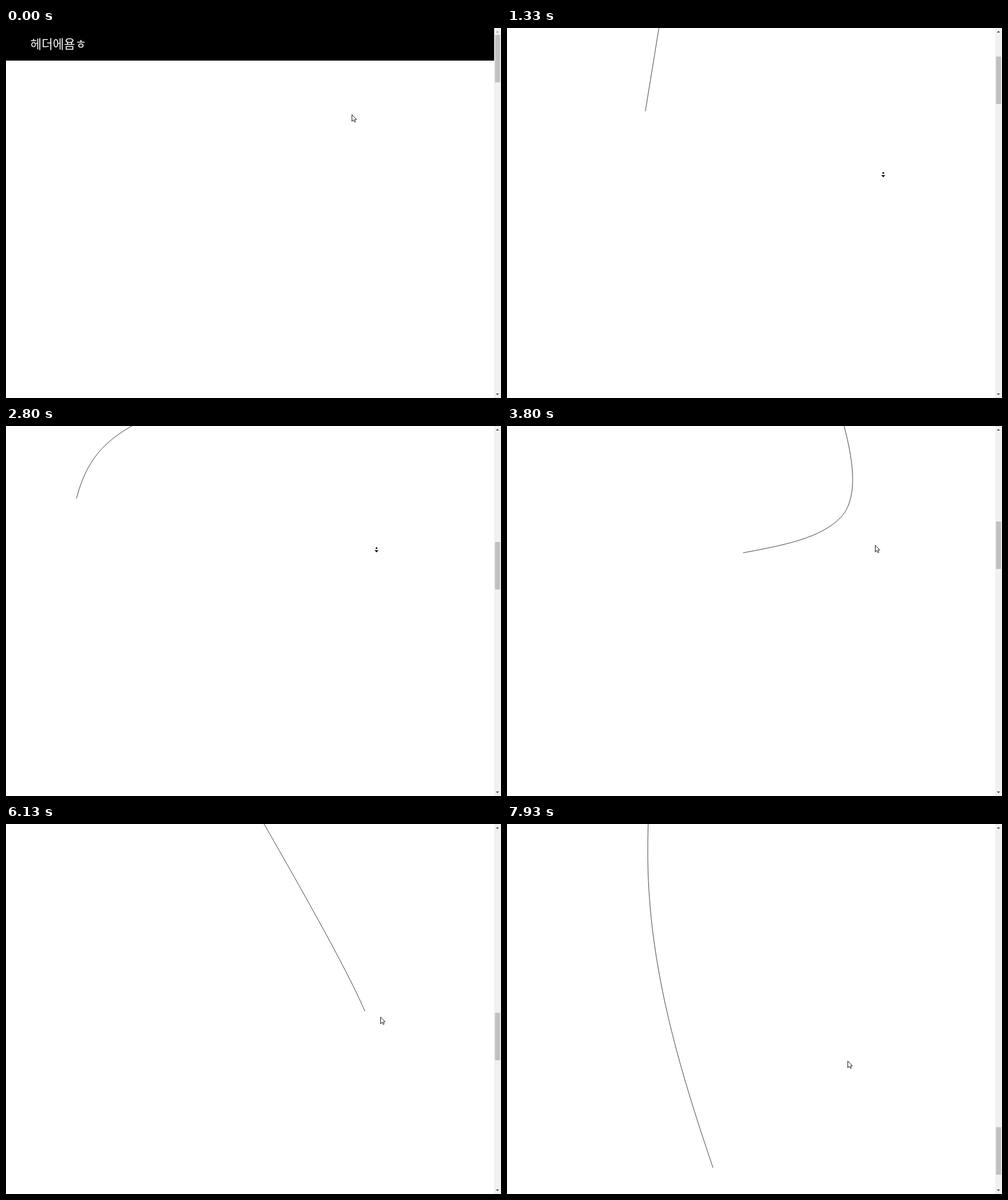
Recreate the animation shown at these times as an HTML page. Size 865 by 647 pixels, loop 8 s.

```html
<!DOCTYPE html>
<html lang="ko">
<head>
<meta charset="utf-8">
<title>Scroll line</title>
<style>
  html, body { margin: 0; width: 100%; height: 100%; overflow: hidden; background: #fff; }
  svg { display: block; width: 865px; height: 647px; }
  text { font: 21.3px "Noto Sans CJK KR", "Noto Sans CJK", sans-serif; fill: #fff; }
  .line { fill: none; stroke: #000; stroke-width: .75; }
</style>
</head>
<body>
<svg viewBox="0 0 865 647">
  <g id="page">
    <rect width="853" height="57"/>
    <text x="42.6" y="36">헤더에욤ㅎ</text>
    <!-- Each part grows while the scroll offset runs from data-from to data-to. -->
    <path class="line" data-from="0" data-to="1537" d="M304.5 57L241.5 443C217 590 520 930 589 1208
      C597 1238 604 1272 604 1301S597 1354 583 1368C548 1404 486 1416 414 1429.5
      C334 1445 274 1456 220 1487C170 1515 140 1549 123.5 1612.5Q116.5 1645 116.5 1679"/>
    <path class="line" data-from="1537" data-to="2478" d="M116.5 1679C116.5 1860 306 2220 451 2478
      C522 2602 597 2735 627 2805"/>
    <path class="line" data-from="2478" data-to="4037" d="M627 2805C665 2888 735 3000 735 3120
      S405 3435 337 3605S246 3935 246 4082C245 4277 298.5 4457 360 4638"/>
  </g>
  <rect x="853" width="12" height="647" fill="#f1f1f1"/>
  <rect id="thumb" x="854.5" width="9" height="83" fill="#c1c1c1"/>
  <path id="upArrow" d="M856 8h5.6l-2.8-3z"/>
  <path d="M856 639h5.6l-2.8 3z" fill="#505050"/>
  <path id="pointer" d="M.5.5V12.2L3.2 9.7 5.1 13.6 6.9 12.8 5.1 9H8.6Z" fill="#fff" stroke="#000" stroke-width=".9"/>
  <g id="panner">
    <circle r="1.6"/>
    <path d="M-3.5 3.7h7L0 7.4z"/>
    <path id="panUp" d="M-3.5-3.7h7L0-7.4z"/>
  </g>
</svg>
<script>
const LOOP = 8000, STEP = 1000 / 15, SCROLL_PER_THUMB_PX = 7.79;
const PAN_START = 730, PAN_MOVE = 860, PAN_END = 3400;
const $ = id => document.getElementById(id);
const lines = [...document.querySelectorAll('.line')];

// Turning points of the gesture: [time, scroll] and [time, x, y].
const scrollKeys = [
  [0, 0], [800, 0], [1333, 296], [2533, 1395], [2800, 1487], [3400, 1540], [3800, 1208],
  [4270, 850], [5133, 1537], [6133, 2478], [6867, 3241], [7933, 4037], [8200, 4100]
];
const mouseKeys = [
  [0, 604, 151], [133, 651, 166], [533, 651, 166], [733, 653, 175], [1333, 657.5, 253.5],
  [2800, 647.5, 213.5], [3800, 643, 208], [5133, 663, 299], [6133, 654, 337], [7933, 595, 414]
];

// Smooth interpolation that never overshoots its keys.
function ease(keys, column, t) {
  const last = keys.length - 1;
  const rate = i => i < 0 || i >= last ? 0
    : (keys[i + 1][column] - keys[i][column]) / (keys[i + 1][0] - keys[i][0]);
  const slope = i => {
    const a = rate(i - 1), b = rate(i);
    return a * b > 0 ? 2 * a * b / (a + b) : 0;
  };
  const next = keys.findIndex(key => key[0] > t);
  if (next < 0) return keys[last][column];
  const i = next - 1, span = keys[next][0] - keys[i][0];
  const u = (t - keys[i][0]) / span, v = 1 - u;
  return keys[i][column] * v * v * (1 + 2 * u) + keys[next][column] * u * u * (1 + 2 * v)
    + span * u * v * (v * slope(i) - u * slope(next));
}

function drawLine(line, scroll) {
  const { from, to } = line.dataset;
  const part = Math.min(1, (scroll - from) / (to - from));
  const length = line.getTotalLength();
  line.style.display = part > 0 ? '' : 'none';
  line.style.strokeDasharray = part < 1 ? `${Math.max(0, part) * length} ${length}` : 'none';
}

const show = (id, visible) => { $(id).style.display = visible ? '' : 'none'; };
const move = (id, x, y) => $(id).setAttribute('transform', `translate(${x} ${y})`);

function draw(now) {
  const t = Math.floor((now % LOOP + 4) / STEP) * STEP;
  const scroll = ease(scrollKeys, 1, t);
  const x = ease(mouseKeys, 1, t), y = ease(mouseKeys, 2, t);
  const panning = t > PAN_START && t < PAN_END;

  move('page', 0, -Math.round(scroll));
  lines.forEach(line => drawLine(line, scroll));
  $('thumb').setAttribute('y', 12 + scroll / SCROLL_PER_THUMB_PX);
  $('upArrow').setAttribute('fill', scroll > 0 ? '#505050' : '#a3a3a3');

  show('pointer', !panning);
  show('panner', panning);
  show('panUp', t < PAN_MOVE);
  move('pointer', Math.round(x), Math.round(y));
  move('panner', x, y);
}

function tick() {
  draw(performance.now());
  requestAnimationFrame(tick);
}
tick();
</script>
</body>
</html>
```
